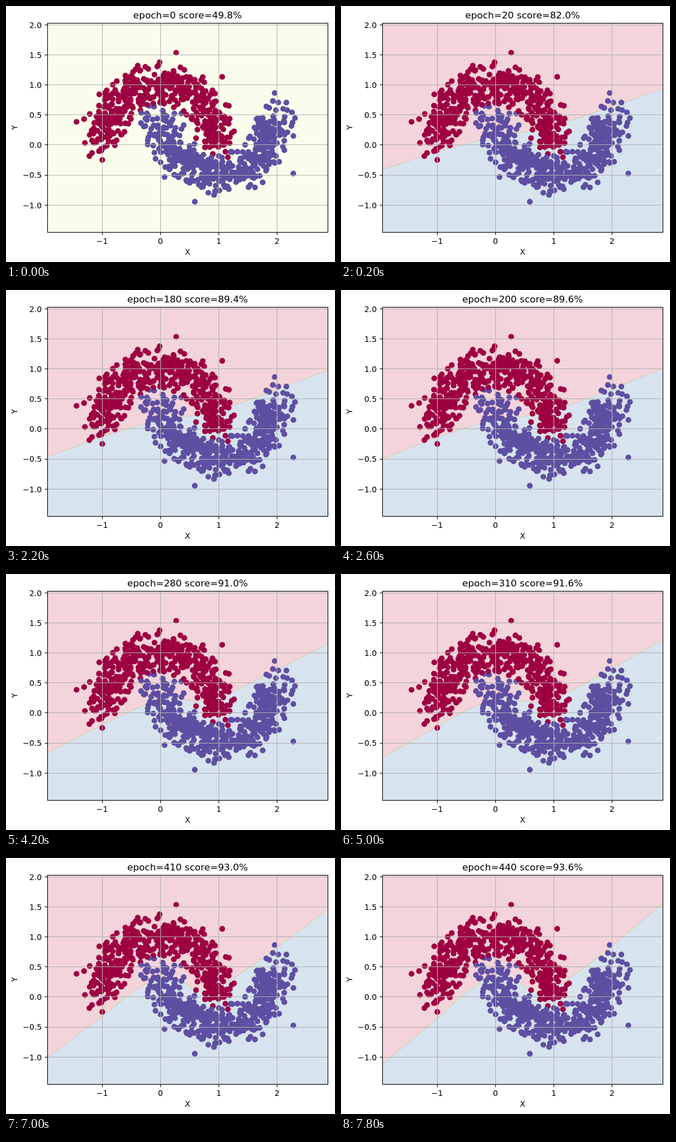
An HTML page that plays this animation: 582 px wide and 453 px high, repeating every 8000 ms.

```html
<!DOCTYPE html>
<html lang="en">
<head>
<meta charset="utf-8">
<title>Decision boundary</title>
<style>
  html, body { margin: 0; width: 100%; height: 100%; overflow: hidden; background: #fff; }
  svg { display: block; width: 582px; height: 453px; }
  text { font: 13.89px "DejaVu Sans", sans-serif; text-anchor: middle; }
  #title { font-size: 16.67px; }
  .tickY { text-anchor: end; }
  .grid { stroke: #b0b0b0; stroke-width: 1.11; }
  .axis { stroke: #000; stroke-width: 1.11; fill: none; }
</style>
</head>
<body>
<svg viewBox="0 0 582 453">
  <clipPath id="area"><rect x="73" y="30" width="496.5" height="370.5"/></clipPath>
  <rect x="73" y="30" width="496.5" height="370.5" fill="#fbfdec"/>
  <g id="regions" clip-path="url(#area)">
    <rect x="73" y="30" width="497" height="371" fill="#f3d4da"/>
    <path id="lower" fill="#d7e3ee"/>
    <path id="edge" fill="none" stroke="#d6cfb4" stroke-width="1.2"/>
  </g>
  <g id="dots"></g>
  <g id="axes"></g>
  <rect class="axis" x="73.5" y="30.5" width="496" height="370"/>
  <text id="title" x="321.2" y="22"></text>
  <text x="321.2" y="440">X</text>
  <text transform="translate(20 215) rotate(-90)">Y</text>
</svg>
<script>
const STEP = 200, STEPS = 40;
const RED = '#9e0142', BLUE = '#5e4fa2';
const $ = id => document.getElementById(id);
const toX = x => 273.2 + 103.1 * x;
const toY = y => 245.4 - 106.3 * y;
const lerp = (a, b, t) => a + (b - a) * t;

function add(parent, tag, attrs, text = '') {
  const el = document.createElementNS('http://www.w3.org/2000/svg', tag);
  for (const key in attrs) el.setAttribute(key, attrs[key]);
  el.textContent = text;
  parent.append(el);
}

// Ticks, labels and grid lines
const line = (cls, x1, y1, x2, y2) => add($('axes'), 'line', { class: cls, x1, y1, x2, y2 });
const label = (v, digits) => v.toFixed(digits).replace('-', '\u2212');
const snap = v => Math.round(v) + 0.5;
for (let v = -1; v <= 2; v++) {
  const x = snap(toX(v));
  line('grid', x, 30, x, 400);
  line('axis', x, 400, x, 405.4);
  add($('axes'), 'text', { x: toX(v), y: 421 }, label(v, 0));
}
for (let v = -1; v <= 2; v += 0.5) {
  const y = snap(toY(v));
  line('grid', 73, y, 569, y);
  line('axis', 68.6, y, 73, y);
  add($('axes'), 'text', { class: 'tickY', x: 63.3, y: Math.round(toY(v) + 5.8) }, label(v, 1));
}

// Two noisy half moons
let seed = 11;
function random() {
  seed = (seed + 0x6D2B79F5) | 0;
  let t = Math.imul(seed ^ (seed >>> 15), 1 | seed);
  t = (t + Math.imul(t ^ (t >>> 7), 61 | t)) ^ t;
  return ((t ^ (t >>> 14)) >>> 0) / 4294967296;
}
function noise() {
  for (;;) {
    const r = 0.2 * Math.sqrt(-2 * Math.log(1 - random()));
    const a = 2 * Math.PI * random();
    if (r < 0.4) return [r * Math.cos(a), r * Math.sin(a)];
  }
}
function moon(fill, count, shape) {
  return Array.from({ length: count }, (_, i) => {
    const [x, y] = shape(Math.PI * i / (count - 1)), [dx, dy] = noise();
    return { x: x + dx, y: y + dy, fill, order: random() };
  });
}
const dots = [
  ...moon(RED, 460, a => [Math.cos(a), Math.sin(a)]),
  ...moon(BLUE, 460, a => [1 - Math.cos(a), 0.5 - Math.sin(a)]),
  // stragglers that mark the extent of the data
  { x: 0.27, y: 1.53, fill: RED, order: 1 },
  { x: 1.06, y: 1.13, fill: RED, order: 1 },
  { x: -1.44, y: 0.38, fill: RED, order: 1 },
  { x: 1.96, y: 0.86, fill: BLUE, order: 1 },
  { x: 2.28, y: -0.48, fill: BLUE, order: 1 },
  { x: 0.59, y: -0.95, fill: BLUE, order: 1 }
];
dots.sort((a, b) => a.order - b.order);
for (const { x, y, fill } of dots) {
  add($('dots'), 'circle', { cx: toX(x), cy: toY(y), r: 5.1, fill });
}

// Training progress; values in between are interpolated
const progress = [
  { step: 1, epoch: 20, score: 82 },
  { step: 6, epoch: 140, score: 88.8 },
  { step: 13, epoch: 200, score: 89.6 },
  { step: 21, epoch: 280, score: 91 },
  { step: 25, epoch: 310, score: 91.6 },
  { step: 31, epoch: 370, score: 92.2 },
  { step: 39, epoch: 440, score: 93.6 }
];
function progressAt(step) {
  const i = Math.max(1, progress.findIndex(p => p.step >= step));
  const a = progress[i - 1], b = progress[i];
  const t = (step - a.step) / (b.step - a.step);
  return { epoch: lerp(a.epoch, b.epoch, t), score: lerp(a.score, b.score, t) };
}

// The boundary bends from an almost straight line into an S
const knots = [73, 170, 230, 285, 350, 410, 569];
const early = [290, 258, 242, 229, 218, 201, 147];
const late = [365, 284, 232, 205, 238, 209, 81];

function boundary(epoch) {
  const bend = Math.max(0, (epoch - 140) / 300) ** 1.35;
  const ys = early.map((y, i) => lerp(y, late[i], bend));
  const last = knots.length - 1;
  const slope = i => {
    const p = Math.max(0, i - 1), n = Math.min(last, i + 1);
    return (ys[n] - ys[p]) / (knots[n] - knots[p]);
  };
  let d = `M${knots[0]},${ys[0]}`;
  for (let i = 0; i < last; i++) {
    const h = (knots[i + 1] - knots[i]) / 3;
    d += `C${knots[i] + h},${ys[i] + h * slope(i)} ` +
      `${knots[i + 1] - h},${ys[i + 1] - h * slope(i + 1)} ${knots[i + 1]},${ys[i + 1]}`;
  }
  return d + 'h2';
}

function show(step) {
  const { epoch, score } = step ? progressAt(step) : { epoch: 0, score: 49.8 };
  const shownScore = (Math.round(score * 5) / 5).toFixed(1);
  $('title').textContent = `epoch=${Math.round(epoch / 10) * 10} score=${shownScore}%`;
  $('regions').style.display = step ? '' : 'none';
  const d = boundary(epoch);
  $('edge').setAttribute('d', d);
  $('lower').setAttribute('d', d + 'V402H73Z');
}

let shown = -1;
const start = performance.now();
function tick(now) {
  const step = Math.floor(Math.max(0, now - start) / STEP) % STEPS;
  if (step !== shown) show(shown = step);
  requestAnimationFrame(tick);
}
tick(start);
</script>
</body>
</html>
```
